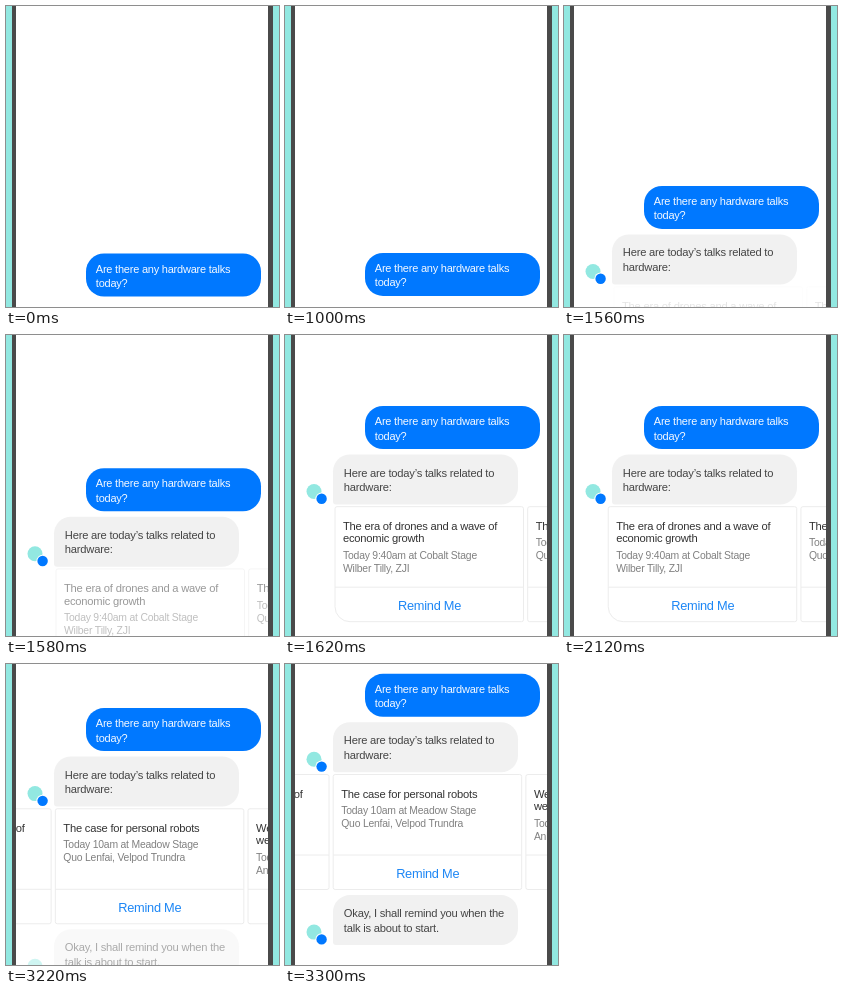
Write an HTML page with a canvas that moves like this. It is 273x301 px and loops after 4.3 s.

```html
<!DOCTYPE html>
<html lang="en">
<head>
<meta charset="utf-8">
<title>Chat</title>
<style>
html, body { margin: 0; width: 100%; height: 100%; overflow: hidden; background: #fff; }
canvas { display: block; width: 273px; height: 301px; }
</style>
</head>
<body>
<canvas id="stage"></canvas>
<script>
const W = 273, H = 301, LOOP = 4300, STEP = 20;
const TEAL = '#92e8e1', BLUE = '#0078ff', LINE = '#ececec';
const FACE = '"Liberation Sans", Arial, sans-serif';
const TRACKING = -0.02;

const canvas = document.getElementById('stage');
const ctx = canvas.getContext('2d');
const ratio = window.devicePixelRatio || 1;
canvas.width = W * ratio;
canvas.height = H * ratio;
ctx.scale(ratio, ratio);

// Each move advances in hard 20 ms steps from its start time.
const moves = {
  reply:  { start: 1000, steps: [0.01, 0.3, 0.8, 1] },
  cards:  { start: 1560, steps: [0.125, 0.5, 0.85, 1] },
  swipe:  { start: 2120, steps: [0.03, 0.2, 0.52, 0.82, 0.96, 1] },
  remind: { start: 3220, steps: [0.44, 0.7, 0.87, 0.96, 1] }
};

const cards = [
  { title: ['The era of drones and a wave of', 'economic growth'],
    detail: ['Today 9:40am at Cobalt Stage', 'Wilber Tilly, ZJI'] },
  { title: ['The case for personal robots'],
    detail: ['Today 10am at Meadow Stage', 'Quo Lenfai, Velpod Trundra'] },
  { title: ['We can build the machines', 'we want to live with'],
    detail: ['Today 11am at Meadow Stage', 'Anka Tilvo'] }
];

function progress({ start, steps }, time) {
  if (time < start) return 0;
  return steps[Math.min(steps.length - 1, Math.floor((time - start) / STEP))];
}

function text(lines, x, y, size, color, leading, align = 'left') {
  ctx.font = `${size}px ${FACE}`;
  ctx.letterSpacing = `${size * TRACKING}px`;
  ctx.fillStyle = color;
  ctx.textAlign = align;
  lines.forEach((line, i) => ctx.fillText(line, x, y + i * leading));
}

function box(x, y, w, h, radius, color) {
  ctx.beginPath();
  ctx.roundRect(x, y, w, h, radius);
  ctx.fillStyle = color;
  ctx.fill();
}

function disc(x, y, r, color) {
  ctx.beginPath();
  ctx.arc(x, y, r, 0, Math.PI * 2);
  ctx.fillStyle = color;
  ctx.fill();
}

function question(y) {
  box(80, y, 175, 43, 18, BLUE);
  text(['Are there any hardware talks', 'today?'], 89.8, y + 19, 11, '#f4f9ff', 14.5);
}

function answer(y, lines, alpha) {
  ctx.globalAlpha = alpha;
  box(48, y, 185, 50, [17, 17, 17, 3], '#f1f1f1');
  text(lines, 58.8, y + 22, 11.2, '#444', 14.5);
  disc(29, y + 37, 7.5, TEAL);
  disc(36.6, y + 44.3, 6.2, '#fff');
  disc(36.6, y + 44.3, 5.2, BLUE);
  ctx.globalAlpha = 1;
}

function card({ title, detail }, x, y, first) {
  ctx.beginPath();
  ctx.roundRect(x, y, 188.5, 115, [2, 2, 2, first ? 15 : 2]);
  ctx.moveTo(x, y + 80.5);
  ctx.lineTo(x + 188.5, y + 80.5);
  ctx.strokeStyle = LINE;
  ctx.lineWidth = 1;
  ctx.stroke();
  const detailY = y + 39.7 + (title.length - 1) * 12.5;
  text(title, x + 8, y + 23, 11.2, '#333', 12.7);
  text(detail, x + 8, detailY, 10.4, '#808080', 13);
  text(['Remind Me'], x + 94.5, y + 103.3, 12.8, '#1c86f5', 0, 'center');
}

function draw(time) {
  const reply = progress(moves.reply, time);
  const list = progress(moves.cards, time);
  const swipe = progress(moves.swipe, time);
  const remind = progress(moves.remind, time);
  const top = 247.5 - 52 * reply - 124.5 * list - 61.2 * remind;
  const left = 50 - 192.5 * swipe - 2 * remind;

  ctx.fillStyle = TEAL;
  ctx.fillRect(0, 0, W, H);
  ctx.fillStyle = '#4a4a4a';
  ctx.fillRect(6, 0, 261, H);

  ctx.save();
  ctx.beginPath();
  ctx.rect(10, 0, 252, H);
  ctx.clip();
  ctx.fillStyle = '#fff';
  ctx.fillRect(0, 0, W, H);

  question(top);
  answer(top + 48.5, ['Here are today’s talks related to', 'hardware:'], reply);
  ctx.globalAlpha = list;
  cards.forEach((item, i) => card(item, left + i * 192.7, top + 100.7, i === 0));
  answer(top + 221.3, ['Okay, I shall remind you when the', 'talk is about to start.'], remind);
  ctx.restore();
}

function tick() {
  draw(performance.now() % LOOP);
  requestAnimationFrame(tick);
}
tick();
</script>
</body>
</html>
```
